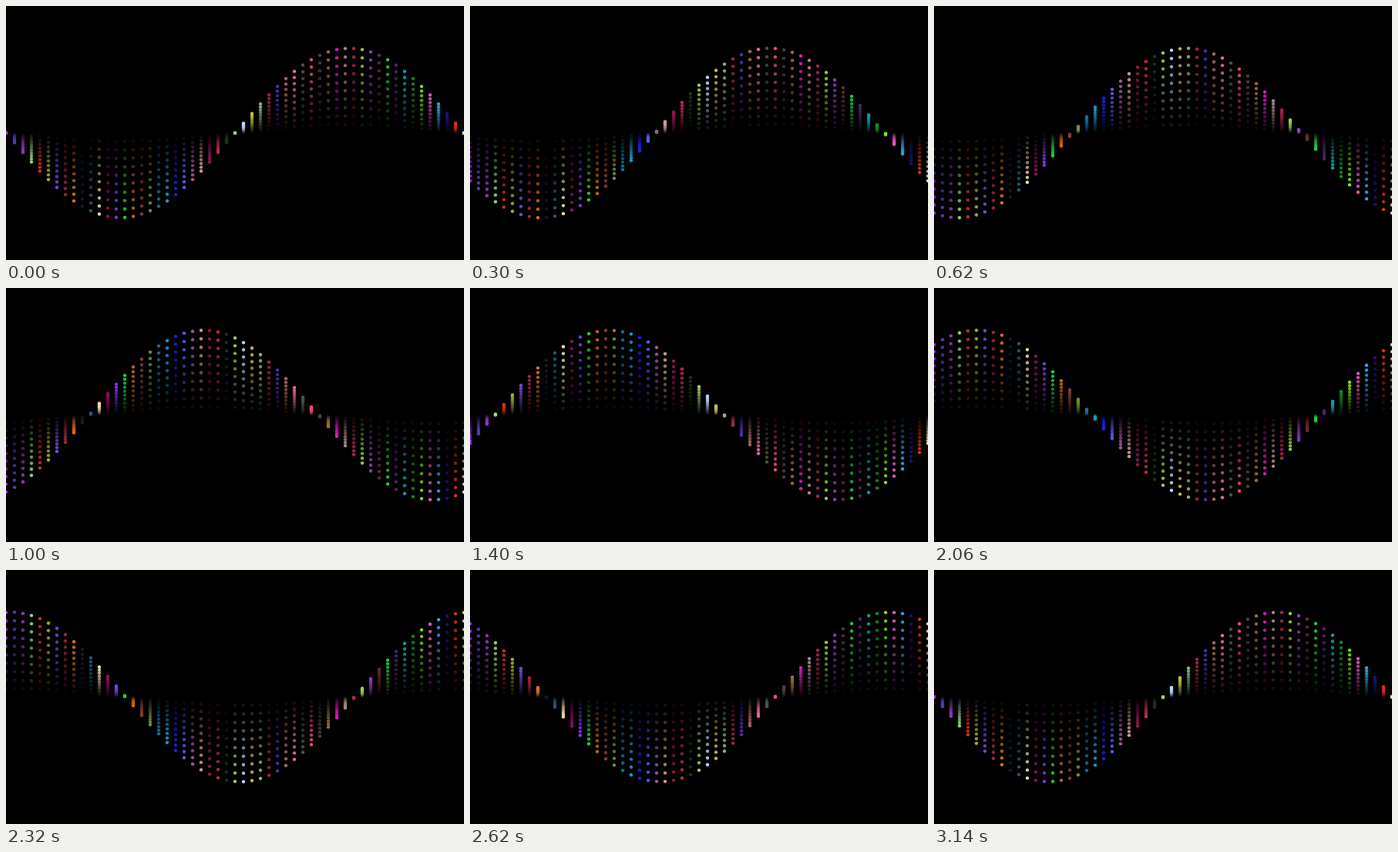
These frames come from a looping animation (540x300 px, 3160 ms). An HTML page with a canvas:

```html
<!DOCTYPE html>
<html>
<head>
<meta charset="utf-8">
<title>Dotted sine wave</title>
<style>
html, body { margin: 0; width: 100%; height: 100%; overflow: hidden; background: #000; }
canvas { display: block; }
</style>
</head>
<body>
<canvas width="540" height="300"></canvas>
<script>
const ctx = document.querySelector('canvas').getContext('2d');
const LOOP = 3160, STEP = 20, GAP = 10, DOTS = 10, MID = 150, AMP = 100;

// One colour per column, left to right
const colors = `a438ec 5040a8 9436c0 94d880 c83418 a0b030 7848d0 a0283c e07018 20142c
186078 f0e0a0 90105c 8038e8 20d048 c06810 804038 789030 1470a0 189cc8
1c24e0 5a5cf0 a05c98 d09c98 981850 c02c50 1c3810 a0d058 c0d8f0 c0c048
80bc84 a02840 5030a8 a86868 f068a8 445c44 f04c78 4c4038 a07030 e418c0
a88888 b02848 90d048 9038c8 6c2c34 2cc83c 4c2868 10a0a8 108c28 78e420
e058c0 30a8e8 181470 d43418 f0e0a0`.split(/\s+/);

function draw(time) {
  const angle = Math.floor(time % LOOP / STEP) * 0.04;
  ctx.globalAlpha = 1;
  ctx.fillStyle = '#000';
  ctx.fillRect(0, 0, 540, 300);
  colors.forEach((color, col) => {
    const x = col * GAP;
    const height = AMP * Math.sin(x / 540 * 2 * Math.PI + angle);
    ctx.fillStyle = '#' + color;
    for (let i = 1; i <= DOTS; i++) {
      const part = i / DOTS;
      ctx.globalAlpha = part;
      ctx.beginPath();
      ctx.arc(x, MID + height * part, 2, 0, 2 * Math.PI);
      ctx.fill();
    }
  });
}

const start = performance.now();
function tick() {
  draw(performance.now() - start);
  requestAnimationFrame(tick);
}
tick();
</script>
</body>
</html>
```
